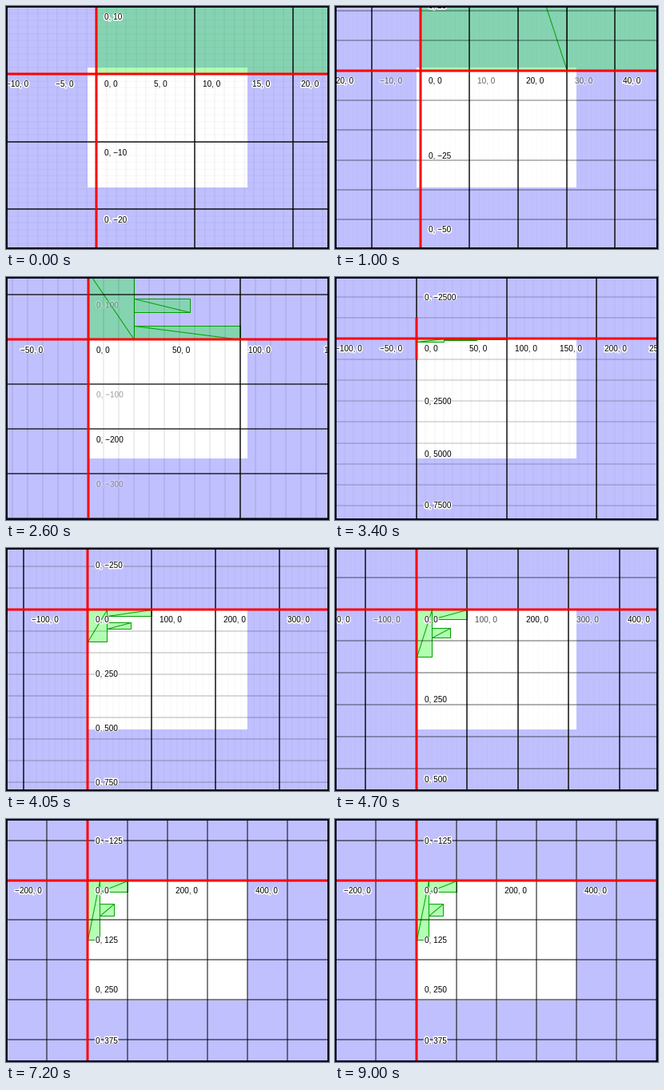
Animation of 404x304 px, one loop 9.8 s. Source, as a matplotlib script:

```python
import math

import matplotlib.pyplot as plt
from matplotlib.animation import FuncAnimation
from matplotlib.collections import LineCollection, PolyCollection
from matplotlib.patches import Polygon, Rectangle
from matplotlib.patheffects import Stroke

W, H, DPI = 404, 304, 64
PX = 72 / DPI                  # points per pixel
STEP_MS, LOOP_MS, STOP_MS = 50, 9800, 9000

LEFT, TOP, VIEW_W, VIEW_H = 102, 77, 200, 150
PAPER = "#c0c0ff"
FRAME = "#08081c"
FILL = (0, 1, 0, 0.3)
EDGE = (0, 0.63, 0)
HALO = [Stroke(linewidth=3 * PX, foreground="white")]

# Rectangles of the letter F in world units: x0, y0, x1, y1
LETTER = [(0, 0, 30, 150), (30, 0, 100, 30), (30, 60, 67, 90)]
ARROW = [(0, 0), (0, 16), (3.7, 12.6), (6.2, 18.6), (8.8, 17.5),
         (6.3, 11.7), (11.3, 11.7)]

fig = plt.figure(figsize=(W / DPI, H / DPI), dpi=DPI, facecolor=PAPER)
ax = fig.add_axes([0, 0, 1, 1])
ax.set_xlim(0, W)
ax.set_ylim(H, 0)
ax.axis("off")

ax.add_patch(Rectangle((LEFT, TOP), VIEW_W, VIEW_H, fc="white", lw=0, zorder=1))
fills = PolyCollection([], facecolors=[FILL], linewidths=0, zorder=2, snap=False)
edges = LineCollection([], colors=[EDGE], linewidths=PX, zorder=3, snap=False)
grid = LineCollection([], linewidths=1.4 * PX, zorder=4, snap=False)
axes = LineCollection([], colors="red", linewidths=3 * PX, zorder=5, snap=False,
                      capstyle="butt")
for item in (fills, edges, grid, axes):
    ax.add_collection(item, autolim=False)

cursor = Polygon([(75 + x, 246.5 + y) for x, y in ARROW], fc="white",
                 ec="black", lw=PX, zorder=8)
ax.add_patch(cursor)
for x, y, w, h in [(0, 0, W, 2), (0, H - 2, W, 2), (0, 0, 2, H), (W - 2, 0, 2, H)]:
    ax.add_patch(Rectangle((x, y), w, h, fc=FRAME, lw=0, zorder=10))


def clamp(v):
    return max(0.0, min(1.0, v))


def pixel(v):
    return math.floor(v) + 0.5


def camera(ms):
    """Blend from unit clip space to the pixel projection."""
    left = 0.1186 * (1 - ms / 10259) ** 7.3
    x = (LEFT + VIEW_W / 2 * left, 0.5 + (VIEW_W / 2 - 0.5) * left)
    y = (TOP + VIEW_H / 2 * left, 0.5 - (VIEW_H / 2 + 0.5) * left)
    return x, y


def visible(origin, scale, step, size, margin=0):
    """Indices of the multiples of step that fall on the stage."""
    a, b = sorted(((-margin - origin) / scale, (size + margin - origin) / scale))
    return range(math.ceil(a / step), math.floor(b / step) + 1)


def grid_marks(origin, scale, size):
    """Pixel positions and opacities of the decimal grid."""
    first = math.ceil(math.log10(6 / abs(scale)))
    for power in range(first, first + 3):
        step = 10.0 ** power
        alpha = clamp((step * abs(scale) / 60) ** 2)
        for i in visible(origin, scale, step, size):
            if i % 10 or power == first + 2:
                yield math.floor(origin + i * step * scale), alpha


def label_marks(origin, scale, size):
    """Values and opacities of the labels along one axis."""
    decade = 10.0 ** math.ceil(math.log10(100 / abs(scale)))
    span = decade * abs(scale)
    if span >= 500:
        step, fade = decade / 10, clamp((span - 500) / 250)
    else:
        step, fade = decade / (2 if span < 200 else 4 if span < 400 else 8), 1
    for i in visible(origin, scale, step, size, 60):
        alpha = fade if i % 2 else 1
        if i and alpha > 0.02:
            yield i * step, alpha


def label(x, y, vx, vy, alpha=1):
    text = f"{vx:.10g}, {vy:.10g}".replace("-", "\u2212")
    x, y = math.floor(x) + 10, math.floor(y) + 16
    style = dict(family="Liberation Sans", size=10 * PX, va="baseline",
                 alpha=alpha, clip_on=True)
    ax.text(x, y, text, zorder=6, path_effects=HALO, **style)
    ax.text(x, y, text, zorder=7, color="black", **style)


def update(frame):
    ms = min(frame * STEP_MS, STOP_MS)
    (ox, sx), (oy, sy) = camera(ms)

    lines, colors = [], []
    for x, alpha in grid_marks(ox, sx, W):
        lines.append([(x, 0), (x, H)])
        colors.append((0, 0, 0, alpha))
    for y, alpha in grid_marks(oy, sy, H):
        lines.append([(0, y), (W, y)])
        colors.append((0, 0, 0, alpha))
    grid.set_segments(lines)
    grid.set_color(colors)

    boxes, outlines = [], []
    for x0, y0, x1, y1 in LETTER:
        l, r = pixel(ox + x0 * sx), pixel(ox + x1 * sx)
        t, b = pixel(oy + y0 * sy), pixel(oy + y1 * sy)
        boxes.append([(l, t), (r, t), (r, b), (l, b)])
        outlines.append([(l, b), (l, t), (r, t), (l, b), (r, b), (r, t)])
    fills.set_verts(boxes)
    edges.set_segments(outlines)

    cx, cy = math.floor(ox), math.floor(oy)
    dx, dy = 1000 * sx, 1000 * sy
    axes.set_segments([[(cx - dx, cy), (cx + dx, cy)],
                       [(cx, cy - dy), (cx, cy + dy)]])

    for text in list(ax.texts):
        text.remove()
    label(ox, oy, 0, 0)
    for v, alpha in label_marks(ox, sx, W):
        label(ox + v * sx, oy, v, 0, alpha)
    for v, alpha in label_marks(oy, sy, H):
        label(ox, oy + v * sy, 0, v, alpha)

    cursor.set_visible(1700 <= ms <= 2000)
    return []


anim = FuncAnimation(fig, update, frames=LOOP_MS // STEP_MS, interval=STEP_MS,
                     init_func=lambda: [], repeat=True, repeat_delay=0)
plt.show()
```
